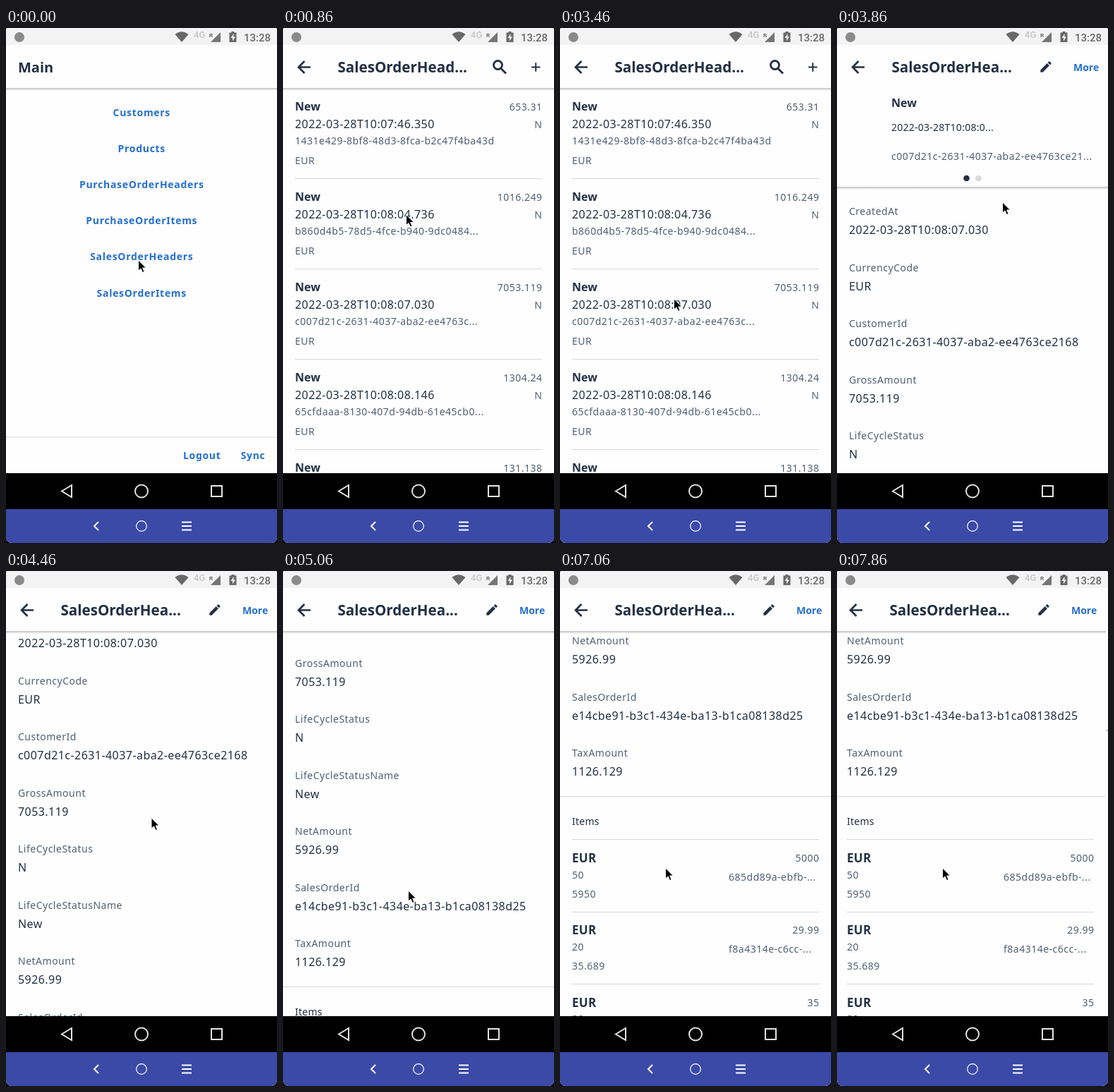
An HTML page that plays this animation: 384 by 730 pixels, repeating every 8000 ms.

```html
<!DOCTYPE html>
<html lang="en">
<head>
<meta charset="utf-8">
<title>Sales orders</title>
<style>
html, body { margin: 0; width: 100%; height: 100%; overflow: hidden; background: #000; }
svg { display: block; width: 384px; height: 730px; border-radius: 2px 2px 8px 8px; }
text { font: 14px "Noto Sans", "Open Sans", sans-serif; letter-spacing: .5px; fill: #505f74; }
.title { font-size: 20.6px; font-weight: 700; letter-spacing: 0; fill: #223044; }
.main { font-size: 20px; }
.bold { font-size: 16px; font-weight: 700; letter-spacing: 0; fill: #223044; }
.currency { font-size: 17px; letter-spacing: .3px; }
.value { font-size: 16px; letter-spacing: .44px; fill: #223044; }
.dark { letter-spacing: .25px; fill: #223044; }
.link { font-weight: 700; letter-spacing: .7px; fill: #256fcf; }
.more { letter-spacing: 0; }
.end { text-anchor: end; }
.mid { text-anchor: middle; }
.status { font: 500 15px Roboto, sans-serif; letter-spacing: 0; fill: #686868; }
.rule { stroke: #d3d7dd; stroke-width: 1; }
.line { fill: none; stroke: #223044; }
.nav { fill: none; stroke: #e4e4e4; stroke-width: 2; }
</style>
</head>
<body>
<svg viewBox="0 0 384 730">
  <defs>
    <linearGradient id="shade" x2="0" y2="1">
      <stop stop-color="#000" stop-opacity=".25"/>
      <stop offset="1" stop-color="#000" stop-opacity="0"/>
    </linearGradient>
    <clipPath id="screen"><path d="M0 24H384V631H0z"/></clipPath>
  </defs>
  <rect width="384" height="730" fill="#fefefe"/>
  <g id="pages" clip-path="url(#screen)"></g>

  <rect width="384" height="24" fill="#f3f3f3"/>
  <circle cx="19" cy="13" r="7" fill="#8a8a8a"/>
  <path d="M239.500 9Q249 1.500 258.500 9L249 20z" fill="#686868"/>
  <text class="status" x="266" y="14" style="font-size:13px;fill:#c6c6c6">4G</text>
  <path d="M304 6V20H290z" fill="#757575"/>
  <text class="status" x="288" y="13" style="font-size:8px;font-weight:700">R</text>
  <path d="M316.500 6.500H319.500V5H323.500V6.500H326.500V20H316.500z" fill="#686868"/>
  <path d="M322.500 8L318.500 14H321V18.500L325 12.500H322.500z" fill="#f3f3f3"/>
  <text class="status" x="337" y="19">13:28</text>

  <rect y="631" width="384" height="51"/>
  <g class="nav">
    <path d="M79 656.500L93 648V665zM291 649H306V664H291z"/>
    <circle cx="192" cy="656.500" r="9"/>
  </g>
  <rect y="682" width="384" height="48" fill="#3b4aa7"/>
  <g class="nav" style="stroke:#fff">
    <path d="M131 700L125 706L131 712M249 700.500H263M249 706H263M249 711.500H263"/>
    <circle cx="192" cy="706" r="7.300" style="stroke-width:1.200"/>
  </g>
  <path id="cursor" d="M0 0V15L3.500 12L6 17.500L8.500 16.500L6.200 11H11z" stroke="#fff" stroke-width="1"/>
</svg>
<script>
const $ = id => document.getElementById(id);
const text = (x, y, content, cls = '') => `<text x="${x}" y="${y}" class="${cls}">${content}</text>`;
const rule = (y, x1 = 17, x2 = 367) => `<path class="rule" d="M${x1} ${y}H${x2}"/>`;
const box = (y, h, fill = '#fefefe') => `<rect y="${y}" width="384" height="${h}" fill="${fill}"/>`;
const shade = y => box(y, 4, 'url(#shade)');
const page = (id, body) => `<g id="${id}">${box(24, 607)}${body}</g>`;

const back = '<path class="line" stroke-width="2.600" d="M39 55.500H22.500M30.500 47L22 55.500L30.500 64"/>';
const search = `<g class="line" stroke-width="2.800"><circle cx="304.500" cy="52.500" r="6"/>
  <path d="M308.500 57L316 64.500"/></g>`;
const plus = '<path class="line" stroke-width="2" d="M352 55.500H364.500M358.200 49.300V61.700"/>';
const pencil = `<path fill="#223044" transform="translate(285.800 44.800) scale(.85)"
  d="M3 17.250V21h3.750L17.810 9.940l-3.750-3.750zM20.710 7.040a1 1 0 0 0 0-1.410l-2.340-2.340a1 1 0 0 0-1.410 0l-1.830 1.830 3.750 3.750z"/>`;

const entities = ['Customers', 'Products', 'PurchaseOrderHeaders', 'PurchaseOrderItems',
  'SalesOrderHeaders', 'SalesOrderItems'];
const mainPage = page('main', shade(85) + box(24, 61) + text(17, 62.5, 'Main', 'title main')
  + entities.map((name, i) => text(192.3, 124.5 + i * 51.2, name, 'link mid')).join('')
  + rule(580, 0, 384) + text(304.5, 611, 'Logout', 'link end') + text(367.5, 611, 'Sync', 'link end'));

const orders = [
  ['07:46.350', '1431e429-8bf8-48d3-8fca-b2c47f4ba43d', '653.31'],
  ['08:04.736', 'b860d4b5-78d5-4fce-b940-9dc0484...', '1016.249'],
  ['08:07.030', 'c007d21c-2631-4037-aba2-ee4763c...', '7053.119'],
  ['08:08.146', '65cfdaaa-8130-407d-94db-61e45cb0...', '1304.24'],
  ['08:09.210', '', '131.138']
];
const orderRow = ([time, id, amount], i) => {
  const y = i * 128;
  return text(17, y + 117, 'New', 'bold') + text(367.5, y + 117, amount, 'end')
    + text(17, y + 142, '2022-03-28T10:' + time, 'value') + text(367.5, y + 142, 'N', 'end')
    + text(17, y + 165, id) + text(17, y + 193, 'EUR') + rule(y + 213.5);
};
const listPage = page('list', orders.map(orderRow).join('') + shade(85) + box(24, 61)
  + back + text(77.5, 62.5, 'SalesOrderHead...', 'title') + search + plus);

const fields = {
  CreatedAt: '2022-03-28T10:08:07.030',
  CurrencyCode: 'EUR',
  CustomerId: 'c007d21c-2631-4037-aba2-ee4763ce2168',
  GrossAmount: '7053.119',
  LifeCycleStatus: 'N',
  LifeCycleStatusName: 'New',
  NetAmount: '5926.99',
  SalesOrderId: 'e14cbe91-b3c1-434e-ba13-b1ca08138d25',
  TaxAmount: '1126.129'
};
const items = [
  ['50', '5950', '5000', '685dd89a-ebfb-...'],
  ['20', '35.689', '29.99', 'f8a4314e-c6cc-...'],
  ['30', '41.65', '35', '']
];
const field = ([label, value], i) =>
  text(17, 265 + i * 79.5, label) + text(17, 292 + i * 79.5, value, 'value');
const itemRow = ([count, gross, net, id], i) => {
  const y = 1019 + i * 102.3;
  return rule(Math.ceil(y) - .5) + text(17, y + 32, 'EUR', 'bold currency') + text(367.5, y + 31, net, 'end')
    + text(17, y + 54.5, count) + text(239, y + 58, id) + text(17, y + 82, gross);
};
const detailPage = page('detail',
  `<g id="content">${Object.entries(fields).map(field).join('')}${rule(957.5, 0, 384)}
  ${text(17, 998, 'Items', 'dark')}${items.map(itemRow).join('')}</g>
  <g id="summary">${shade(225)}${box(85, 140)}
  ${text(77, 112, 'New', 'bold')}${text(77, 146, '2022-03-28T10:08:0...', 'dark')}
  ${text(77, 187, 'c007d21c-2631-4037-aba2-ee4763ce21...')}
  <circle cx="183.500" cy="213" r="4.300" fill="#223044"/><circle cx="200.500" cy="213" r="4.300" fill="#dadada"/></g>
  ${box(24, 61)}${back}${text(77.5, 62.5, 'SalesOrderHea...', 'title')}${pencil}${text(335, 61, 'More', 'link more')}
  <g id="barShade">${shade(85)}</g>`);

const itemPage = page('item', shade(225) + box(24, 201));
$('pages').innerHTML = mainPage + listPage + detailPage + itemPage;

// Eased interpolation through [time, value...] points.
function track(t, points) {
  const next = points.findIndex(p => p[0] > t);
  if (next < 0) return points.at(-1).slice(1);
  if (!next) return points[0].slice(1);
  const [a, b] = [points[next - 1], points[next]];
  const p = (t - a[0]) / (b[0] - a[0]);
  const eased = p * p * (3 - 2 * p);
  return a.slice(1).map((v, i) => v + (b[i + 1] - v) * eased);
}

const pageIds = ['main', 'list', 'detail', 'item'];
const pageTrack = [[320, 0], [620, 1], [3540, 1], [3840, 2], [7844, 2], [8144, 3]];
const scrollTrack = [[4060, 0], [4860, 368], [5060, 368], [5600, 638]];
const cursorTrack = [[260, 187.5, 329], [1460, 161.5, 200], [2260, 161.5, 200], [3260, 161.5, 384],
  [3460, 161.5, 384], [3860, 234.5, 247], [5060, 177.5, 453], [5660, 140.5, 362], [6660, 149.5, 421]];
const move = (id, x, y) => $(id).setAttribute('transform', `translate(${x} ${y})`);
const show = (id, visible) => $(id).setAttribute('display', visible ? 'inline' : 'none');

function draw(t) {
  const [position] = track(t, pageTrack);
  pageIds.forEach((id, i) => {
    const offset = i - position;
    show(id, Math.abs(offset) < 1);
    move(id, Math.round(offset * 384), 0);
  });
  const scroll = Math.round(track(t, scrollTrack)[0]);
  move('content', 0, -scroll);
  move('summary', 0, -Math.min(scroll, 140));
  show('summary', scroll < 140);
  show('barShade', scroll >= 140);
  move('cursor', ...track(t, cursorTrack));
}

// The screen refreshes in 200 ms steps.
function tick() {
  const t = performance.now() % 8000;
  draw(t < 60 ? 0 : 60 + Math.floor((t - 60) / 200) * 200);
  requestAnimationFrame(tick);
}
tick();
</script>
</body>
</html>
```
